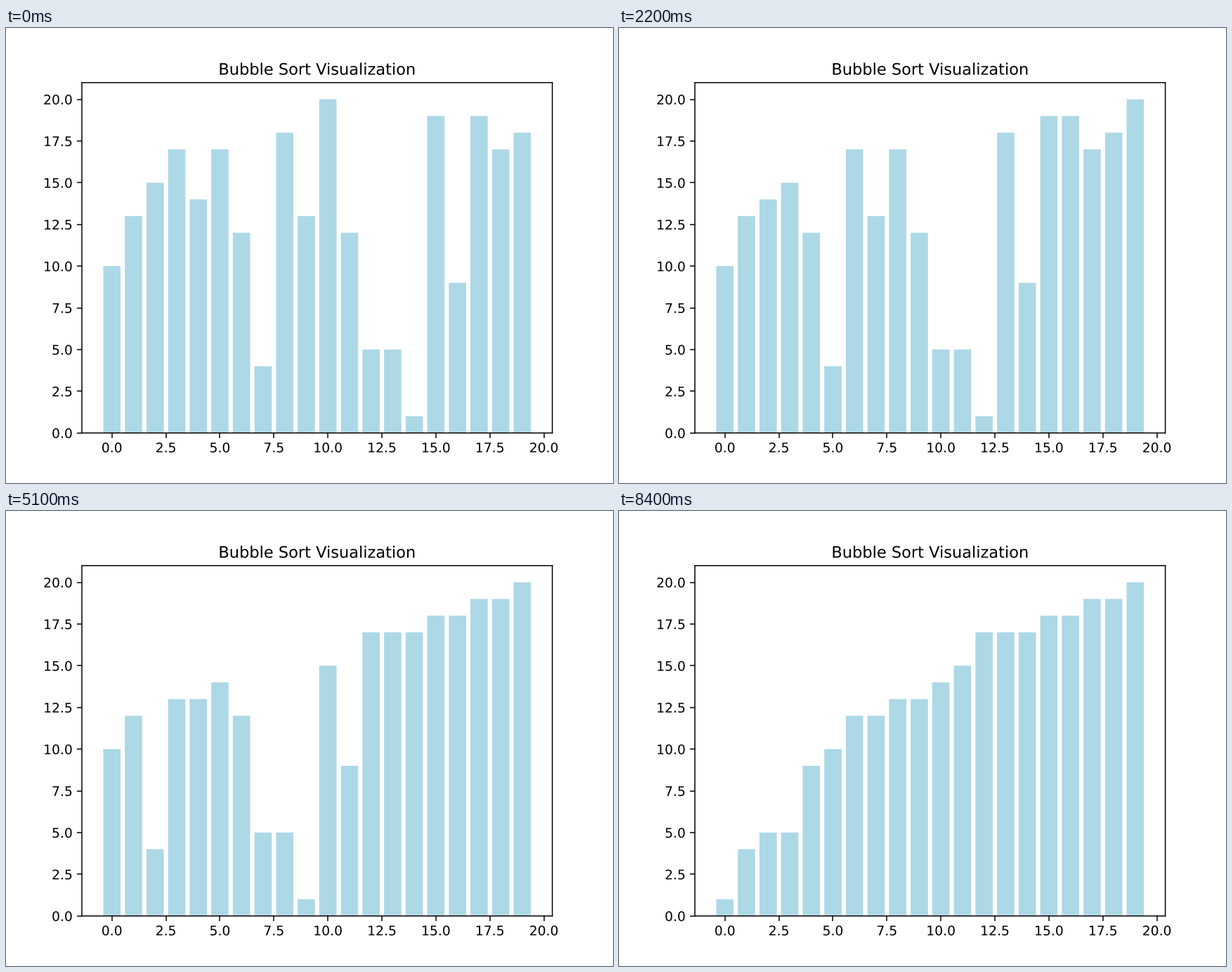
A matplotlib script that plays this animation: 864 by 648 pixels, repeating every 8500 ms.

```python
import matplotlib.pyplot as plt
from matplotlib import patheffects
from matplotlib.animation import FuncAnimation

HEIGHTS = [10, 13, 15, 17, 14, 17, 12, 4, 18, 13, 20, 12, 5, 5, 1, 19, 9, 19, 17, 18]


def bubble_states(values):
    """Yield the list before sorting and after every swap."""
    a = list(values)
    yield a[:]
    for end in range(len(a) - 1, 0, -1):
        for j in range(end):
            if a[j] > a[j + 1]:
                a[j], a[j + 1] = a[j + 1], a[j]
                yield a[:]


states = list(bubble_states(HEIGHTS))

# Smooth edges: no snapping to whole pixels, no hinting.
plt.rcParams.update({
    "font.family": "DejaVu Sans",
    "path.snap": False,
    "text.hinting": "none",
})

fig, ax = plt.subplots(figsize=(6.4, 4.8), dpi=135)
ax.set_title("Bubble Sort Visualization")
bars = ax.bar(range(len(HEIGHTS)), HEIGHTS, color="lightblue")

# Draw text as outlines so that it can sit between pixels.
for label in [ax.title, *ax.get_xticklabels(), *ax.get_yticklabels()]:
    label.set_path_effects([patheffects.Normal()])


def update(i):
    for bar, height in zip(bars, states[i]):
        bar.set_height(height)
    return list(bars)


def reset():
    return update(0)


anim = FuncAnimation(fig, update, frames=len(states), init_func=reset,
                     interval=100, repeat=True, repeat_delay=0, blit=False)
plt.show()
```
